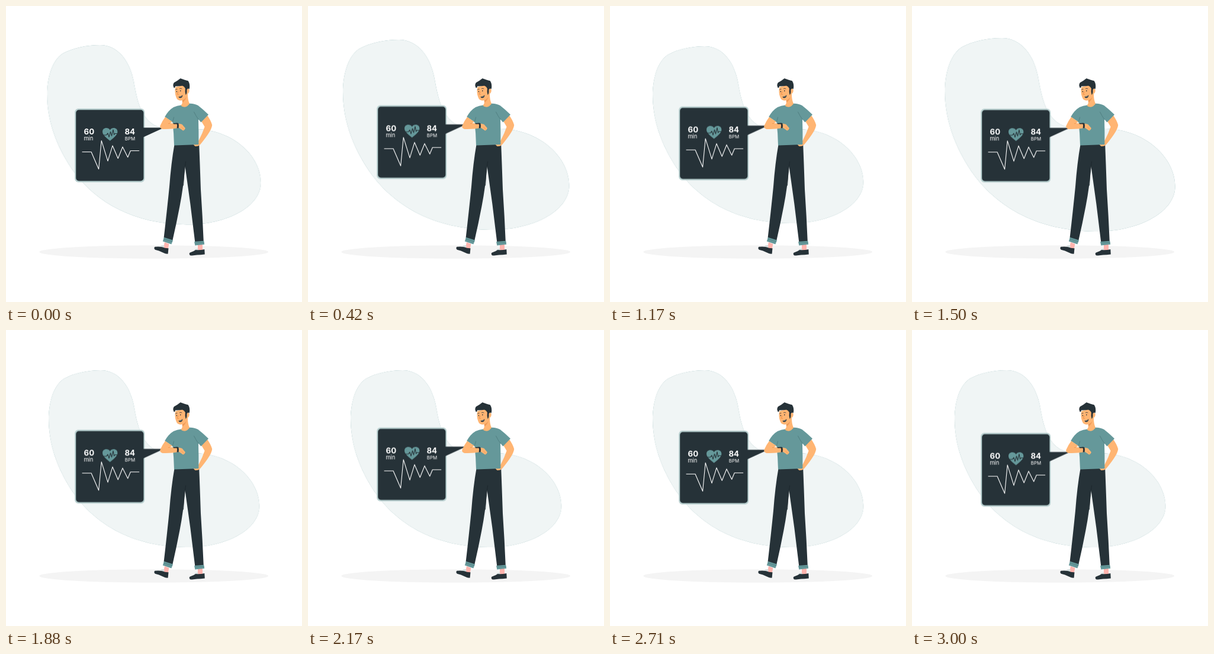
Recreate the animation shown at these times as an HTML page. Size 500 px wide and 500 px high, loop 3040 ms.

```html
<!DOCTYPE html>
<html lang="en">
<head>
<meta charset="utf-8">
<title>Heart rate check</title>
<style>
  html, body { margin: 0; width: 100%; height: 100%; overflow: hidden; background: #fff; }
  svg { display: block; width: 100%; height: 100%; }

  .teal { fill: #65989a; }
  .dark { fill: #263238; }
  .skin { fill: #ffb573; }
  .line { fill: none; stroke-linecap: round; stroke-linejoin: round; }

  .blob {
    transform-origin: 250px 218px;
    animation: heartbeat 3.04s linear -0.0417s infinite;
  }
  .bubble { animation: float 1.52s linear -0.0417s infinite; }

  text { fill: #fff; font-family: Inter, "Open Sans", sans-serif; }
  .num { font-size: 13.3px; font-weight: 700; }
  .min { font-size: 9.4px; }
  .bpm { font-size: 7.9px; }

  @keyframes heartbeat {
    0%, 30%, 40%, 60%, 100% { transform: scale(1); }
    10%, 50% { transform: scale(1.1); }
  }
  @keyframes float {
    0%, 100% { transform: translateY(0); }
    50% { transform: translateY(-10px); }
  }
</style>
</head>
<body>
<svg viewBox="0 0 500 500">
  <defs>
    <path id="shape" d="M160 68 C190 68 210 95 216 128 C222 160 228 197 262 206 C285 211 310 205 340 210
      C392 219 428 258 428 297 C428 340 366 368 304 367 C215 366 155 330 118 281
      C92 245 72 200 72 150 C72 128 78 95 98 82 C115 73 138 68 160 68Z"/>
  </defs>

  <!-- backdrop: the pale wash over teal leaves a fine edge -->
  <g class="blob">
    <use href="#shape" class="teal"/>
    <use href="#shape" fill="#fff" opacity=".9"/>
  </g>

  <ellipse cx="249.7" cy="415.5" rx="193.5" ry="11.3" fill="#f4f4f4"/>

  <g class="bubble">
    <rect x="116.2" y="173.8" width="118" height="124.6" rx="6" fill="#b5cdcd"/>
    <rect class="dark" x="118.2" y="176" width="114.2" height="120" rx="5"/>
    <path class="dark" d="M231 206 H267 L231 222.5Z"/>
    <text class="num" x="131.6" y="217.2">60</text>
    <text class="min" x="131.4" y="228">min</text>
    <text class="num" x="200.4" y="217.2">84</text>
    <text class="bpm" x="200.8" y="227.2">BPM</text>
    <path class="teal" d="M175.7 228.3 C171 224 163 219 163 213 C163 206 172 204.5 175.7 210
      C179.4 204.5 188.4 206 188.4 213 C188.4 219 180.4 224 175.7 228.3Z"/>
    <path class="line" stroke="#263238" stroke-width="1.1"
      d="M165 218.5 H169.5 L172 215.5 L174 222 L176.5 213 L178.5 220 L181 209.5 L182.5 218 L184 216 H187.5"/>
    <path class="line" stroke="#fff" stroke-width="1.1"
      d="M129 247 H144 L156.6 276 L161.2 228 L172 262.5 L180 236.5 L189.2 258 L197 238.5 L205.7 256 L210.3 245 H224.7"/>
  </g>

  <!-- feet -->
  <g fill="#ffb4ae">
    <path d="M268 399 L275.5 402 L273.5 411 L266 408Z"/>
    <path d="M324 402 L332 402 L332 413 L324 413Z"/>
  </g>
  <g fill="#d5dfdf">
    <path d="M262 404.5 L267.5 404 L267 408.5 L260.5 407.5Z"/>
    <path d="M318.5 411 L324 409.5 L325 413 L318 414Z"/>
  </g>
  <path class="dark" d="M251.5 406.8 Q259 406 264 407.2 Q269 409.4 274.5 409.2 L273.6 418.6 Q270 419 265 416.4 Q258 413 252 411.8 Q249 409 251.5 406.8Z"/>
  <path class="dark" d="M310.5 416.8 Q317 414.6 320.5 412 Q327 413 335.3 411 L335.8 419.6 Q329 420.4 323 420.6 Q316 421.8 311 421.2 Q308.6 418.6 310.5 416.8Z"/>

  <!-- trousers -->
  <path class="dark" d="M284.5 234 H326.2 Q327.5 265 329 310 Q332 355 333.8 398 L319.3 399 Q312 335 302.4 270
    Q300 305 293.5 338 Q288 367 281.2 396.5 L266.6 391.5 Q272 345 276 305 Q279 265 284.5 234Z"/>
  <path class="line" stroke="#1a2429" stroke-width=".8" d="M303.5 263 Q300 284 299.6 303"/>
  <path class="teal" d="M267 390.8 L282 395.6 L279.4 402.6 L264.8 397.6Z"/>
  <path class="teal" d="M318.2 398 L334.2 396.8 L335.2 402.8 L319.2 404.6Z"/>
  <path class="line" stroke="#4b797b" stroke-width=".6" d="M266.4 393.3 L281 398 M318.8 400.2 L334.4 399.2"/>

  <!-- far arm, hand on hip -->
  <path class="skin" d="M339.5 184 Q346 193 348.2 201 Q347.8 207 341 217 Q334 227 328.5 233.5 Q325 237.6 319.5 237
    L316 233.5 L317.5 229.3 L325.5 227.2 Q332 215 335.6 204 L329 193Z"/>

  <!-- shirt -->
  <path class="teal" d="M296 167.5 Q303 164.4 311 164.8 Q319 165.2 324.4 168 Q333 174.5 342 183.6 L329.4 196.5 L325 191.5
    Q325.6 214 325.4 234 L284 235.4 Q283.6 215 281.4 196 L268.2 187.2 Q274.5 176 283 171 Q289 168.4 296 167.5Z"/>
  <path class="line" stroke="#4b797b" stroke-width=".8" d="M317.5 179 Q321 186 325 191.5 M281.4 196 L283.5 188"/>

  <!-- neck and head -->
  <path class="skin" d="M296.8 156 L307 146 Q306.6 158 310 165 Q306 171 301 170.6 Q296 170 295.8 167.4 Q298.6 165 298 158Z"/>
  <path d="M297.5 159 Q302 158 304.5 153.5 Q303 160 298 163Z" fill="#ee9b59"/>
  <path class="skin" d="M286.2 137 Q284.4 147 287.4 154 Q289.6 160.6 296.5 159.6 Q302.5 158.5 305 149
    Q310.5 147.5 309.6 141.5 Q308 138 304.5 140 L301.5 133Z"/>
  <path class="dark" d="M283.8 138.6 Q281 133 283.8 129.4 Q289 127 294.6 122.2 Q301 124.6 307.8 126.6 Q311.6 133 309.6 140.4
    Q307.2 138.4 305.4 141.4 Q306 147.5 303.6 150.2 Q302 145 302.8 139.2 Q301 135.8 298 134.8 Q291 135.8 286.2 135.4 Q285.6 138 283.8 138.6Z"/>
  <g class="dark">
    <ellipse cx="288.4" cy="144.5" rx=".75" ry="1.1"/>
    <ellipse cx="294.8" cy="143.3" rx=".75" ry="1.1"/>
  </g>
  <path class="line" stroke="#263238" stroke-width=".8" d="M286.4 141.4 Q287.4 140 289 140.4 M293.4 139.6 Q295.4 138.4 297 139.8"/>
  <path class="line" stroke="#ed893e" stroke-width=".9" d="M291 145 Q289.2 148 289.4 149.2 L291.4 149.4"/>
  <path class="dark" d="M291.4 153.4 Q295.6 153 298.4 150.2 Q298 155.4 294 155.4 Q292 155 291.4 153.4Z"/>
  <path d="M292.4 153.4 Q295.6 153 297.6 151.4 Q296.4 153.8 292.4 153.4Z" fill="#fff"/>

  <!-- near arm with watch -->
  <path class="skin" d="M269 187.6 L281 195.8 L277.2 198 L289 198.4 Q294 198.2 297.4 200 L302.8 206.2 Q302.2 209.8 299 210.4
    Q295.5 208 292.5 206 Q277 208.6 264.4 208 Q259.2 206.4 260.4 202.2 Q264 194 269 187.6Z"/>
  <path class="line" stroke="#ed893e" stroke-width=".6" d="M277.2 198 L274.4 198.6 M296.4 204.4 L300 208"/>
  <path class="dark" d="M288.4 197.8 L291.4 198 Q292.4 202 291.6 206.2 L288.6 206.4 Q289.6 202 288.4 197.8Z"/>
  <path class="dark" d="M282.4 198 L289.6 197.4 L290.4 199.4 L283 199.6Z"/>
</svg>
</body>
</html>
```
